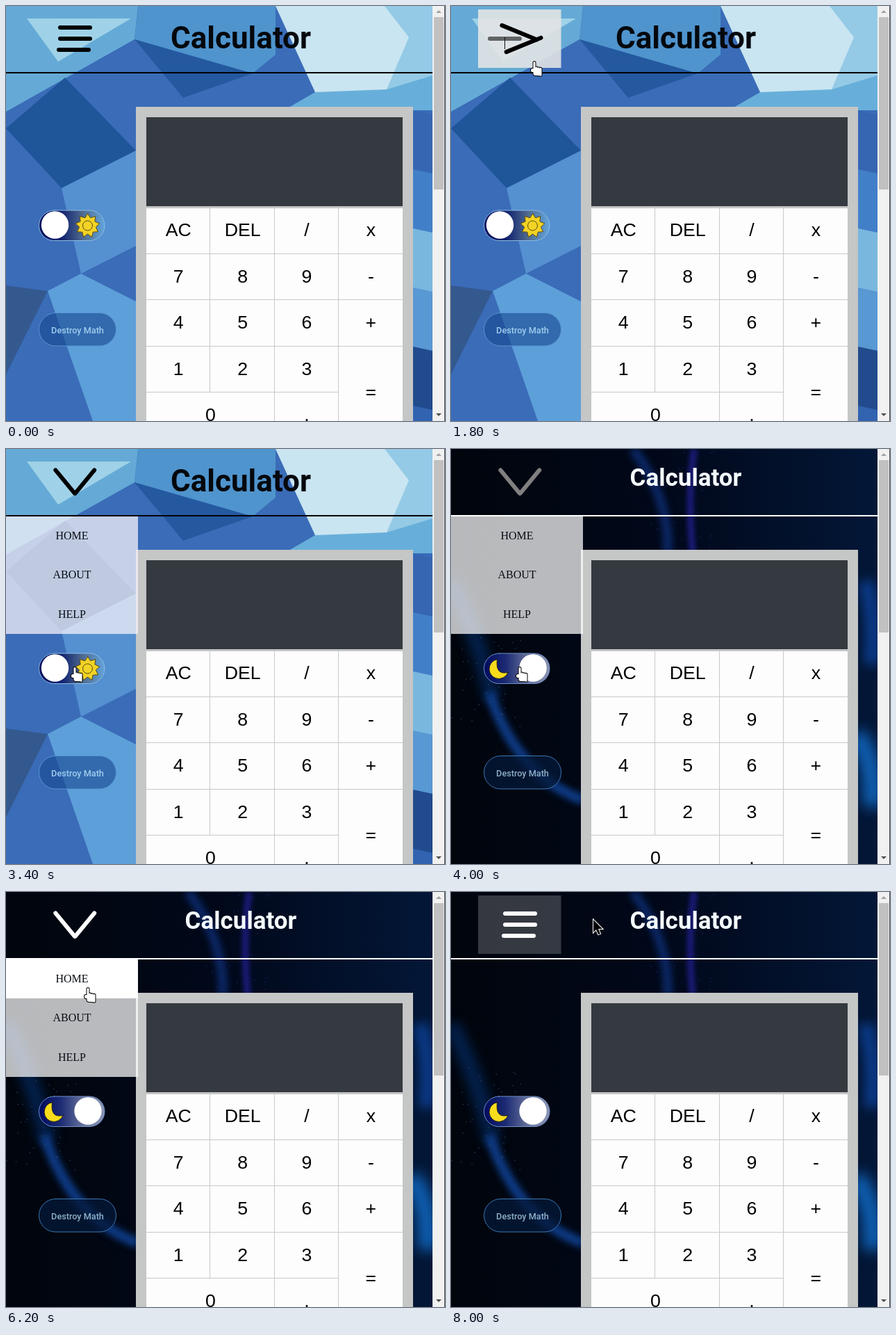
An HTML page with a canvas that plays this animation: 632 by 597 pixels, repeating every 8100 ms.

```html
<!DOCTYPE html>
<html lang="en">
<head>
<meta charset="utf-8">
<title>Calculator</title>
<style>
  html, body { margin: 0; width: 100%; height: 100%; overflow: hidden; background: #fff; }
  canvas { display: block; }
</style>
</head>
<body>
<canvas id="stage" width="632" height="597"></canvas>
<script>
const W = 632, H = 597, LOOP = 8100, PAGE = 614, SWITCH = 3700;
const ctx = document.getElementById('stage').getContext('2d');
const UI = 'Roboto, "Open Sans", sans-serif';
const ARIAL = '"Liberation Sans", Arial, sans-serif';
const TIMES = '"Liberation Serif", "Times New Roman", serif';

const clamp = v => Math.max(0, Math.min(1, v));
const mix = (a, b, p) => a + (b - a) * p;
const ramp = (t, a, b) => {
  const p = clamp((t - a) / (b - a));
  return p * p * (3 - 2 * p);
};
// Rises over a..b, holds, and falls over c..d.
const pulse = (t, a, b, c, d) => ramp(t, a, b) - ramp(t, c, d);

let seed = 7;
const random = () => (seed = (seed * 16807) % 2147483647) / 2147483647;

function layer(paint) {
  const c = document.createElement('canvas');
  c.width = PAGE;
  c.height = H;
  paint(c.getContext('2d'));
  return c;
}

function gradient(g, x0, x1, ...colors) {
  const grad = g.createLinearGradient(x0, 0, x1, 0);
  colors.forEach((c, i) => grad.addColorStop(i / (colors.length - 1), c));
  return grad;
}

function rect(color, x, y, w, h) {
  ctx.fillStyle = color;
  ctx.fillRect(x, y, w, h);
}

function poly(g, color, ...pts) {
  g.beginPath();
  for (let i = 0; i < pts.length; i += 2) g.lineTo(pts[i], pts[i + 1]);
  g.closePath();
  g.fillStyle = color;
  g.fill();
}

function line(x1, y1, x2, y2) {
  ctx.beginPath();
  ctx.moveTo(x1, y1);
  ctx.lineTo(x2, y2);
  ctx.stroke();
}

function text(str, x, y, font, color) {
  ctx.font = font;
  ctx.fillStyle = color;
  ctx.textAlign = 'center';
  ctx.fillText(str, x, y);
}

function pill(x, y, w, h, fill, edge) {
  ctx.beginPath();
  ctx.roundRect(x, y, w, h, h / 2);
  ctx.fillStyle = fill;
  ctx.fill();
  ctx.strokeStyle = edge;
  ctx.lineWidth = 1;
  ctx.stroke();
}

const facets = layer(g => {
  g.fillStyle = '#3a6cb8';
  g.fillRect(0, 0, PAGE, H);
  poly(g, '#65aad6', 0, 0, 190, 0, 185, 48, 0, 152);
  poly(g, '#9fd2e8', 30, 18, 180, 18, 75, 80);
  poly(g, '#4f94cd', 190, 0, 388, 0, 388, 70, 355, 97, 185, 48);
  poly(g, '#2459a0', 185, 48, 355, 97, 255, 132);
  poly(g, '#1f5599', 0, 176, 85, 103, 187, 208, 80, 262);
  poly(g, '#5590d0', 80, 262, 187, 208, 187, 345, 108, 385);
  poly(g, '#34598f', 0, 402, 60, 410, 0, 530);
  poly(g, '#5d9fd9', 60, 410, 108, 385, 187, 425, 187, 597, 125, 597);
  poly(g, '#67afda', 445, 124, 614, 90, 614, 150, 400, 150);
  poly(g, '#94cae6', 545, 0, 614, 0, 614, 100, 548, 120);
  poly(g, '#c9e5f1', 388, 0, 545, 0, 580, 45, 548, 120, 445, 124);
  // The strip right of the calculator, as even bands.
  ['#3666b2', '#427fc9', '#7ab7df', '#5898d3', '#214b8c', '#3163b0'].forEach((c, i) => {
    const y = 150 + i * 85;
    poly(g, c, 586, y, 614, y + 6, 614, H, 586, H);
  });
});

const nebula = layer(g => {
  g.fillStyle = gradient(g, 0, PAGE, '#01050c', '#01081a', '#031737');
  g.fillRect(0, 0, PAGE, H);
  const smear = (color, width, x, y, cx, cy, x2, y2) => {
    g.filter = `blur(${width / 3}px)`;
    g.strokeStyle = color;
    g.lineWidth = width;
    g.beginPath();
    g.moveTo(x, y);
    g.quadraticCurveTo(cx, cy, x2, y2);
    g.stroke();
  };
  smear('#03204a', 24, 0, 190, 40, 270, 60, 360);
  smear('#0d3a84', 15, 55, 350, 95, 470, 190, 505);
  smear('#0a2662', 14, 262, 0, 315, 70, 312, 150);
  smear('#1a1a74', 10, 350, 0, 340, 70, 348, 150);
  smear('#0b3a88', 22, 596, 190, 612, 240, 605, 310);
  smear('#0f60b4', 28, 582, 410, 612, 450, 606, 515);
  g.filter = 'none';
  for (let i = 0; i < 70; i++) {
    const left = random() < 0.6;
    g.fillStyle = left ? 'rgba(70,100,140,.5)' : 'rgba(40,45,140,.6)';
    g.fillRect(left ? random() * 100 : 285 + random() * 100,
      left ? 240 + random() * 160 : random() * 140, 1.5, 1.5);
  }
});

function drawHeader(dark) {
  rect(dark ? '#fff' : '#000', 0, 95, PAGE, 2);
  if (dark) text('Calculator', 338, 53, '600 35px ' + UI, '#f4fbff');
  else text('Calculator', 338, 61, '600 44px ' + UI, '#05080c');
}

function drawCalculator() {
  const cw = 92.4, rh = 66.5, x0 = 202, y0 = 290, grey = '#c9c9c9';
  const key = (s, col, row) =>
    text(s, x0 + col * cw, y0 + row * rh + 8, '26.7px ' + ARIAL, '#000');
  rect('#c5c6c6', 187, 145, 399, H);
  rect('#353a40', x0, 160, 369, 128);
  rect('#fdfdfd', x0, y0 + 1, 369, H);
  for (let i = 1; i < 5; i++) {
    rect(grey, x0, Math.round(y0 + i * rh) - 1, i < 4 ? 369 : 277, 1);
    if (i < 4) rect(grey, Math.round(x0 + i * cw) - 1, y0, 1, i > 1 ? H : 266);
  }
  ['AC DEL / x', '7 8 9 -', '4 5 6 +', '1 2 3'].forEach((row, r) =>
    row.split(' ').forEach((s, c) => key(s, c + 0.5, r + 0.5)));
  key('=', 3.5, 4);
  key('0', 1, 4.5);
  key('.', 2.5, 4.5);
}

function drawSun(x, y) {
  ctx.beginPath();
  for (let i = 0; i < 18; i++) {
    const a = i * Math.PI / 9 - Math.PI / 2, r = i % 2 ? 12 : 17.5;
    ctx.lineTo(x + r * Math.cos(a), y + r * Math.sin(a));
  }
  ctx.closePath();
  ctx.moveTo(x + 7, y);
  ctx.arc(x, y, 7, 0, Math.PI * 2);
  ctx.fillStyle = '#f2d325';
  ctx.strokeStyle = '#5a4a10';
  ctx.fill();
  ctx.stroke();
}

function drawMoon() {
  ctx.beginPath();
  ctx.arc(69, 316.5, 14, 0.35, -1.75);
  ctx.quadraticCurveTo(63.6, 326, 82.2, 321.3);
  ctx.fillStyle = '#f7dc1c';
  ctx.strokeStyle = '#1a1a20';
  ctx.fill();
  ctx.stroke();
}

function drawToggle(t, dark) {
  const fill = dark
    ? gradient(ctx, 47, 142, '#020a5c', '#1c2b74', '#66709a', '#8a95b4')
    : gradient(ctx, 47, 142, '#020a5c', '#0d1e6c', '#4f6a90', '#62a5dd');
  pill(47.5, 294, 94.5, 43.5, fill, dark ? '#6f8fc8' : '#8dbbe2');
  if (dark) drawMoon();
  else drawSun(117.5, 316);
  ctx.beginPath();
  ctx.arc(mix(70.5, 118, ramp(t, SWITCH, SWITCH + 280)), 315, 19.7, 0, Math.PI * 2);
  ctx.fillStyle = '#fff';
  ctx.fill();
}

function drawDestroy(dark) {
  pill(47.5, 441.5, 111, 47.5,
    dark ? 'rgba(4,24,56,.75)' : 'rgba(22,72,146,.6)', dark ? '#3d78b4' : '#5795d0');
  text('Destroy Math', 103, 471, '500 12.7px ' + UI, dark ? '#8db0c8' : '#a0cdee');
}

function drawMenu(t, dark, mouse) {
  ctx.globalAlpha = pulse(t, 1850, 2100, 7200, 7500);
  ['HOME', 'ABOUT', 'HELP'].forEach((name, i) => {
    const top = Math.round(97 + i * 56.3), end = Math.round(97 + (i + 1) * 56.3);
    const over = mouse.x < 190 && mouse.y >= top && mouse.y < end;
    rect(over ? '#fff' : dark ? 'rgba(255,255,255,.72)' : 'rgba(247,243,250,.74)',
      0, top, 190, end - top);
    text(name, 95, top + 33, '16px ' + TIMES, '#080c14');
  });
  ctx.globalAlpha = 1;
}

// A bar given by its centre, length and tilt.
function bar(x, y, length, angle) {
  const dx = Math.cos(angle) * length / 2, dy = Math.sin(angle) * length / 2;
  line(x - dx, y - dy, x + dx, y + dy);
}

function drawBurger(t) {
  const glow = pulse(t, 900, 1400, 2450, 3100) + pulse(t, 6600, 7000, 7600, 8200);
  rect(`rgba(229,229,229,${0.88 * glow})`, 39, 5, 119.5, 84);

  const p = clamp((t - 1600) / 455) - clamp((t - 7150) / 455);
  const tone = Math.round(255 * clamp((t - SWITCH) / 600));
  const length = 43 + 44 * p * (1 - p), tilt = 0.88 * p;
  ctx.lineCap = 'round';
  ctx.lineWidth = 6;
  ctx.strokeStyle = `rgb(${tone},${tone},${tone})`;
  bar(99.5 - 14.5 * p ** 3, 31 + 16 * p, length, tilt);
  bar(97.5 + 16 * p, 63 - 16 * p, length, -tilt);
  if (p < 1) {
    ctx.globalAlpha = 1 - p;
    bar(99.5 - 50 * p, 47, 43, 0);
    ctx.globalAlpha = 1;
  }
  // Blinking text caret: first in the heading, then carried by the middle bar.
  if (t >= 500 && t < 3500 && Math.floor(t / 500) % 2) {
    if (t < 1500) rect('#0a1420', 237, 0, 1, 89);
    else rect('#101010', Math.round(99 - 50 * p), 45, 1, 17);
  }
}

function drawScrollbar() {
  rect('#f1f1f1', PAGE, 0, W - PAGE, H);
  rect('#c1c1c1', 616, 16, 14, 248);
  rect('#4a4a4a', 631, 0, 1, H);
  poly(ctx, '#a3a3a3', 619, 10, 627, 10, 623, 6);
  poly(ctx, '#505050', 619, 586, 627, 586, 623, 590);
}

// Pointer stops: arrival, departure, place.
const STOPS = [
  { at: 500, to: 500, x: 330, y: 130 },
  { at: 900, to: 900, x: 141, y: 83 },
  { at: 1500, to: 2300, x: 119, y: 80 },
  { at: 2800, to: 2800, x: 107, y: 161 },
  { at: 3300, to: 4450, x: 98, y: 314 },
  { at: 5100, to: 6200, x: 117, y: 138 },
  { at: 7000, to: 7100, x: 112, y: 62 },
  { at: 7900, to: LOOP, x: 205, y: 40 },
];

function pointer(t) {
  const i = STOPS.findIndex(s => t <= s.to);
  const b = STOPS[i], a = STOPS[i - 1] || b;
  const p = ramp(t, a.to, b.at);
  const x = mix(a.x, b.x, p), y = mix(a.y, b.y, p);
  const onBurger = x >= 39 && x <= 158 && y <= 89;
  const onToggle = x <= 142 && y >= 294 && y <= 338;
  const onLink = t > SWITCH && x <= 118 && Math.abs(y - 125) < 15;
  return { x, y, hand: onBurger || onToggle || onLink };
}

const ARROW = new Path2D('M0 0V18L4 14 7 21 10 20 7 13H13Z');
const HAND = new Path2D();
for (let i = 0; i < 4; i++) HAND.roundRect(i * 3 - 0.5, i ? 7 + i * 0.6 : 0, 3, 12, 1.5);
HAND.roundRect(-0.5, 11, 12, 9, 3);
HAND.roundRect(-4, 10, 5, 5, 2);

function drawPointer({ x, y, hand }) {
  const shape = hand ? HAND : ARROW;
  ctx.save();
  ctx.translate(x, y);
  ctx.lineWidth = 2;
  ctx.strokeStyle = hand ? '#000' : '#fff';
  ctx.fillStyle = hand ? '#fff' : '#000';
  ctx.stroke(shape);
  ctx.fill(shape);
  ctx.restore();
}

function draw(t) {
  const dark = t >= SWITCH, mouse = pointer(t);
  ctx.drawImage(dark ? nebula : facets, 0, 0);
  drawHeader(dark);
  drawCalculator();
  drawToggle(t, dark);
  drawDestroy(dark);
  drawBurger(t);
  drawMenu(t, dark, mouse);
  drawScrollbar();
  if (t >= 500) drawPointer(mouse);
}

const start = performance.now();
function tick() {
  draw((performance.now() - start) % LOOP);
  requestAnimationFrame(tick);
}
tick();
</script>
</body>
</html>
```
